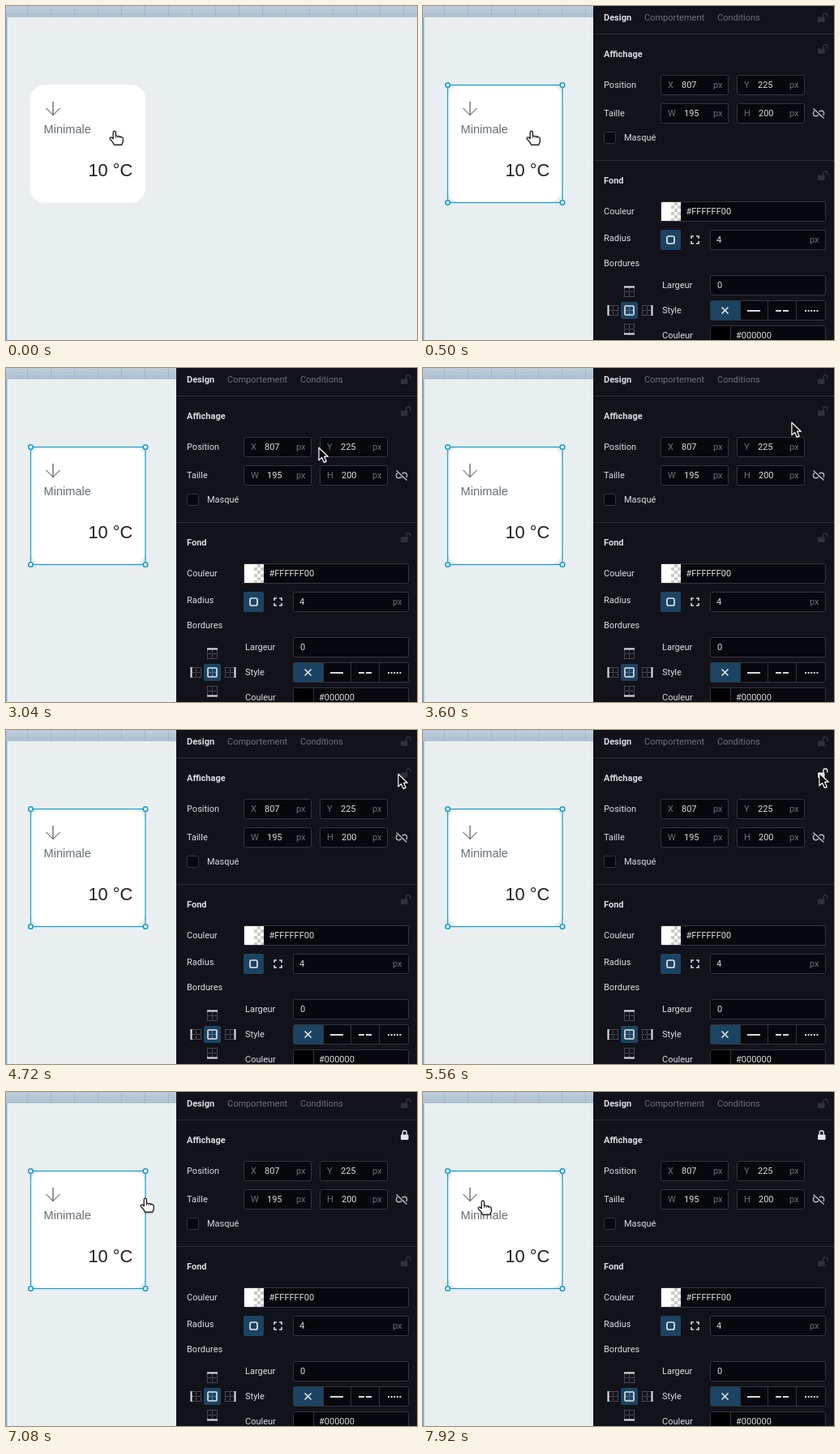
Recreate the animation shown at these times as an HTML page with a canvas. Size 507 by 412 pixels, loop 8 s.

```html
<!DOCTYPE html>
<html lang="fr">
<head>
<meta charset="utf-8">
<title>Panneau de conception</title>
<style>
html, body { margin: 0; width: 100%; height: 100%; overflow: hidden; background: #e9eff1; }
canvas { display: block; width: 507px; height: 412px; }
</style>
</head>
<body>
<canvas id="stage"></canvas>
<script>
const W = 507, H = 412, LOOP = 8000;
const PANEL_AT = 500, HOVER_AT = 5000, LOCK_AT = 5800;
const canvas = document.getElementById('stage');
const dpr = window.devicePixelRatio || 1;
canvas.width = W * dpr;
canvas.height = H * dpr;
const ctx = canvas.getContext('2d');

const UI = 'Roboto, sans-serif';
const CARD = '"Liberation Sans", Arial, sans-serif';
const C = {
  panel: '#11121a', field: '#07080d', edge: '#33343c', rule: '#2b2c35',
  text: '#dcdde0', dim: '#6e6f76', faint: '#303138', active: '#1c4462',
  select: '#149bce', icon: '#d9dade'
};

// Time, left, top, pointer kind ('h' hand, 'a' arrow)
const moves = [
  [0, 127, 153, 'h'], [2480, 163, 152, 'h'], [2600, 167, 153, 'a'],
  [2740, 287, 126, 'a'], [3040, 385, 97, 'a'], [3320, 438, 79, 'a'],
  [3600, 454, 66, 'a'], [3880, 467, 58, 'a'], [4160, 477, 55, 'a'],
  [4440, 482, 53, 'a'], [4720, 483, 53, 'a'], [5000, 486, 53, 'a'],
  [5280, 487, 52, 'a'], [5560, 488, 52, 'a'], [6220, 481, 56, 'a'],
  [6520, 264, 115, 'a'], [6640, 259, 115, 'h'], [6800, 190, 126, 'h'],
  [7080, 165, 130, 'h'], [7360, 111, 132, 'h'], [7640, 88, 134, 'h'],
  [7920, 67, 133, 'h']
];

const handPath = new Path2D('M5.2 10.8V2.7Q5.2 1.2 6.8 1.2T8.4 2.7V7.2L11 7.5 13.6 8.1 16 8.9Q17.3 9.3 17.3 10.8V14L15.7 18.2H6.4Q5.9 16.2 3.7 13.6L1.3 10.9Q.6 9.5 2 9T5.2 10.8Z');
const arrowPath = new Path2D('M.9 1.2V16.8L4.6 13.4 7.3 19.4 10.2 18.1 7.6 12.2H12.3Z');

function rect(x, y, w, h, fill) {
  ctx.fillStyle = fill;
  ctx.fillRect(x, y, w, h);
}

function rounded(x, y, w, h, r, fill, stroke) {
  ctx.beginPath();
  ctx.roundRect(x, y, w, h, r);
  if (fill) { ctx.fillStyle = fill; ctx.fill(); }
  if (stroke) { ctx.strokeStyle = stroke; ctx.stroke(); }
}

function line(points, color, width = 1) {
  ctx.beginPath();
  points.forEach(([x, y]) => ctx.lineTo(x, y));
  ctx.strokeStyle = color;
  ctx.lineWidth = width;
  ctx.stroke();
  ctx.lineWidth = 1;
}

function text(str, x, y, color = C.text, font = `11px ${UI}`, align = 'left') {
  ctx.font = font;
  ctx.textAlign = align;
  ctx.fillStyle = color;
  ctx.fillText(str, x, y);
}

const heading = (str, y) => text(str, 223, y, C.text, `bold 11px ${UI}`);

function field(x, y, w, h = 24) {
  rounded(x + .5, y + .5, w - 1, h - 1, 2, C.field, C.edge);
}

function numberField(x, y, name, value, valueX) {
  field(x, y, 84, 25);
  text(name, x + 9, y + 16, C.dim);
  text(value, valueX, y + 16);
  text('px', x + 65, y + 16, C.dim);
}

function lock(y, open, color) {
  const x = 487;
  rounded(x, y + 5.5, open ? 8.5 : 9.5, 6.5, 1, color);
  const left = open ? x + 6.8 : x + 2.2;
  const right = left + 5;
  ctx.beginPath();
  ctx.moveTo(left, y + 6);
  ctx.lineTo(left, y + 3.3);
  ctx.arc((left + right) / 2, y + 3.3, 2.5, Math.PI, 0);
  ctx.lineTo(right, y + (open ? 5.6 : 6));
  ctx.strokeStyle = color;
  ctx.lineWidth = 1.4;
  ctx.stroke();
  ctx.lineWidth = 1;
}

function backdrop() {
  rect(0, 0, W, H, '#e9eff1');
  const sky = ctx.createLinearGradient(0, 0, 0, 14);
  sky.addColorStop(0, '#becddc');
  sky.addColorStop(1, '#aabccd');
  rect(0, 0, W, 14, sky);
  for (let x = 26; x < W; x += 29) rect(x, 0, 1, 13, 'rgba(130,150,172,.35)');
  for (let y = 3; y < 13; y += 4) rect(0, y, W, 1, 'rgba(255,255,255,.08)');
  rect(0, 13, W, 1, '#b9c7d3');
  rect(0, 14, 1.4, H, '#74aae6');
}

function card() {
  rounded(30, 97, 142, 145.5, 18, '#fff');
  line([[58, 118], [58, 134.5]], '#333');
  line([[49.5, 126], [58, 134.5], [66.5, 126]], '#333');
  text('Minimale', 46.6, 157, '#666d75', `14.56px ${CARD}`);
  text('10 °C', 156.3, 210, '#1d2125', `21.84px ${CARD}`, 'right');
}

function selection() {
  ctx.strokeStyle = C.select;
  ctx.lineWidth = 1.2;
  ctx.strokeRect(30.5, 97.5, 141.5, 145);
  for (const x of [30.5, 172]) for (const y of [97.5, 242.5]) {
    ctx.beginPath();
    ctx.arc(x, y, 2.8, 0, 7);
    ctx.fillStyle = '#fff';
    ctx.fill();
    ctx.lineWidth = 1.6;
    ctx.stroke();
  }
  ctx.lineWidth = 1;
}

function brokenLink() {
  ctx.save();
  ctx.translate(488, 132.5);
  ctx.strokeStyle = '#b5b6bb';
  ctx.lineWidth = 1.4;
  for (const side of [-1, 1]) {
    ctx.beginPath();
    ctx.arc(side * 3.4, 0, 3.2, 0, 7);
    ctx.stroke();
  }
  ctx.restore();
  line([[481.5, 126], [495, 138.5]], C.panel, 3.4);
  line([[481.5, 126.5], [494.5, 138.5]], '#c5c6ca', 1.3);
}

// Dotted cell grid with one solid edge
function edgeIcon(cx, cy, dx, dy) {
  for (let i = -6; i <= 6; i += 2) for (let j = -6; j <= 6; j += 2) {
    if (i % 6 === 0 || j % 6 === 0) rect(cx + i, cy + j, 1, 1, '#85868b');
  }
  if (dx) rect(cx + dx * 6 - .5, cy - 6, 2, 13, '#e6e7ea');
  else rect(cx - 6, cy + dy * 6 - .5, 13, 2, '#e6e7ea');
}

function borderPicker() {
  edgeIcon(254, 352, 0, -1);
  edgeIcon(254, 398, 0, 1);
  edgeIcon(234, 375, -1, 0);
  edgeIcon(276, 375, 1, 0);
  rounded(244, 365, 21, 21, 2, C.active);
  for (let i = -4; i <= 4; i += 2) {
    rect(254 + i, 375, 1, 1, '#8fa6b7');
    rect(254, 375 + i, 1, 1, '#8fa6b7');
  }
  ctx.lineWidth = 1.6;
  rounded(249, 370, 11, 11, 1, null, '#e6e7ea');
  ctx.lineWidth = 1;
}

function radiusRow() {
  text('Radius', 223, 290);
  rounded(293, 276, 25, 25, 2, C.active);
  ctx.lineWidth = 1.7;
  rounded(301, 284, 9, 9, 2, null, '#e6e7ea');
  ctx.lineWidth = 1;
  for (const sx of [-1, 1]) for (const sy of [-1, 1]) {
    const x = 335.5 + sx * 4.5, y = 288.5 + sy * 4.5;
    line([[x, y - sy * 3], [x, y], [x - sx * 3, y]], C.icon, 1.6);
  }
  field(354, 276, 143, 25);
  text('4', 362, 292);
  text('px', 477, 292, C.dim);
}

function colorRow() {
  text('Couleur', 223, 257);
  field(293, 241, 204, 25);
  rect(294, 242, 24, 23, '#fff');
  for (let i = 0; i < 3; i++) for (let j = 0; j < 6; j++) {
    if ((i + j) % 2) rect(306 + i * 4, 242 + j * 4, 4, Math.min(4, 23 - j * 4), '#c9c9c9');
  }
  text('#FFFFFF00', 324.5, 257);
}

function styleRow() {
  text('Style', 295, 379);
  field(354, 363, 143, 25);
  rect(355, 364, 36, 23, C.active);
  for (const x of [391, 425, 460]) rect(x, 364, 1, 23, C.edge);
  line([[368.5, 371.5], [376.5, 379.5]], '#e6e7ea', 1.6);
  line([[376.5, 371.5], [368.5, 379.5]], '#e6e7ea', 1.6);
  rect(400, 375, 16, 2, C.icon);
  for (const x of [435, 444]) rect(x, 375, 7, 2, C.icon);
  for (let i = 0; i < 5; i++) rect(471 + i * 3.6, 375, 2, 2, C.icon);
}

function panel(t) {
  rect(210, 0, W - 210, H, C.panel);
  heading('Design', 18);
  text('Comportement', 273, 18, '#707178');
  text('Conditions', 363, 18, '#707178');
  rect(210, 34, W - 210, 1, C.rule);
  rect(210, 190, W - 210, 1, C.rule);
  lock(8, true, C.faint);
  lock(203, true, C.faint);
  lock(47, t < LOCK_AT, t < HOVER_AT ? C.faint : '#e2e3e6');

  heading('Affichage', 63);
  text('Position', 223, 101);
  numberField(293, 85, 'X', '807', 319);
  numberField(387, 85, 'Y', '225', 413);
  text('Taille', 223, 136);
  numberField(293, 120, 'W', '195', 322);
  numberField(387, 120, 'H', '200', 414);
  brokenLink();
  field(223, 155, 15, 15);
  text('Masqué', 248, 166);

  heading('Fond', 219);
  colorRow();
  radiusRow();
  text('Bordures', 223, 321);
  borderPicker();
  text('Largeur', 295, 348);
  field(354, 332, 143, 25);
  text('0', 363, 348);
  styleRow();
  text('Couleur', 295, 410);
  field(354, 394, 143, 25);
  rect(355, 395, 24, 20, '#000');
  rect(379, 395, 1, 20, C.edge);
  text('#000000', 386, 410);
}

function pointer(t) {
  const [, x, y, kind] = moves.findLast(m => m[0] <= t);
  const hand = kind === 'h';
  const path = hand ? handPath : arrowPath;
  ctx.save();
  ctx.translate(x, y);
  ctx.lineJoin = 'round';
  ctx.shadowColor = 'rgba(0,0,0,.4)';
  ctx.shadowBlur = 2 * dpr;
  ctx.shadowOffsetY = dpr;
  ctx.fillStyle = hand ? '#fff' : '#0b0b0d';
  ctx.strokeStyle = hand ? '#111' : '#fff';
  ctx.lineWidth = 1.2;
  ctx.fill(path);
  ctx.shadowColor = 'transparent';
  ctx.stroke(path);
  if (hand) {
    for (const kx of [8.4, 11, 13.6]) line([[kx, 7.3], [kx, 10]], '#222', .9);
  }
  ctx.restore();
}

function frame(now) {
  const t = now % LOOP;
  ctx.setTransform(dpr, 0, 0, dpr, 0, 0);
  backdrop();
  card();
  if (t >= PANEL_AT) {
    selection();
    panel(t);
  }
  pointer(t);
}

const start = performance.now();
function tick() {
  frame(performance.now() - start);
  requestAnimationFrame(tick);
}
tick();
</script>
</body>
</html>
```
